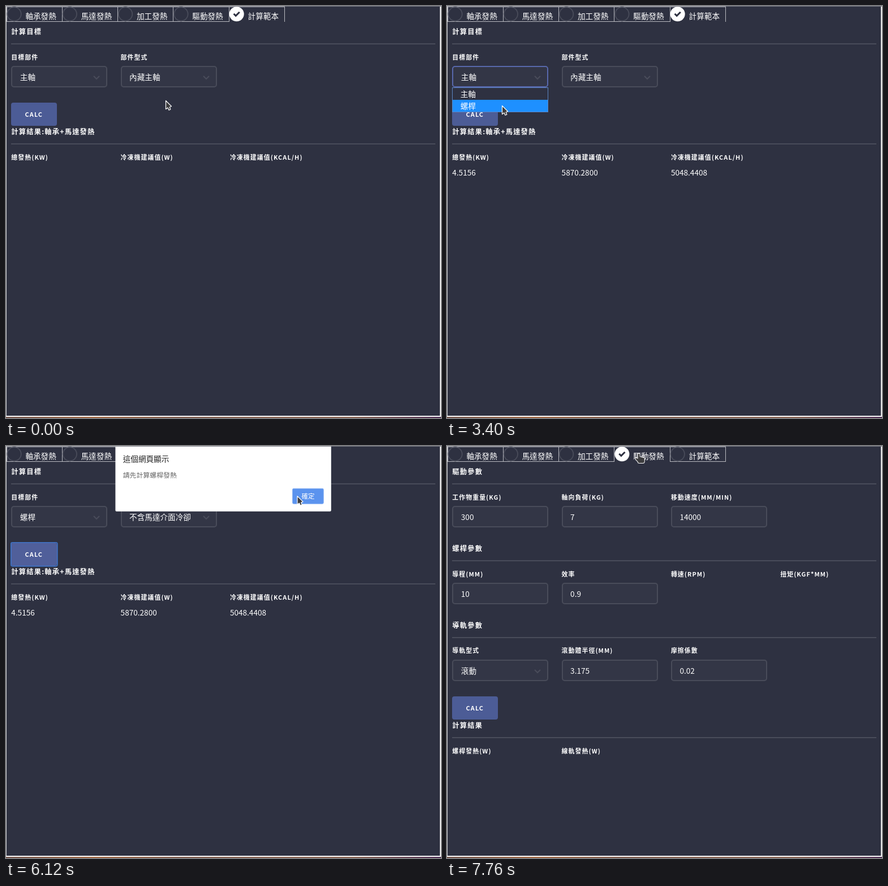
An HTML page with a canvas that plays this animation: 769 px wide and 729 px high, repeating every 8000 ms.

```html
<!DOCTYPE html>
<html lang="zh-Hant">
<head>
<meta charset="utf-8">
<title>發熱計算</title>
<style>
html, body { margin: 0; width: 100%; height: 100%; overflow: hidden; background: #2e3141; }
canvas { display: block; }
</style>
</head>
<body>
<canvas id="stage" width="769" height="729"></canvas>
<script>
const W = 769, H = 729, LOOP = 8000;
const FONT = '"Noto Sans CJK TC", "Noto Sans CJK", sans-serif';
const BG = '#2e3141', DIM = '#494c5a', PRIMARY = '#4c5c96', TAB_LINE = '#b9bac0';
const EM = 13.6, LABEL = 0.8 * EM, HEAD = 0.9 * EM;
const LEFT = 9.3, COLUMN = 193.3, SECTION = 135.8, TAB = 98.3;
const col = i => LEFT + COLUMN * i;

const screen = document.getElementById('stage').getContext('2d');
const layer = document.createElement('canvas');
layer.width = W;
layer.height = 120;
const dialogCtx = layer.getContext('2d');
let g = screen;

// Stops of the pointer; it eases to each one between two times
const stops = [
  { from: 440, to: 520, x: 270, y: 171 },
  { from: 680, to: 1040, x: 99, y: 192 },
  { from: 1440, to: 1520, x: 71, y: 193 },
  { from: 2280, to: 2640, x: 94, y: 129 },
  { from: 3280, to: 3400, x: 97, y: 176 },
  { from: 4360, to: 4480, x: 74, y: 193 },
  { from: 5280, to: 5640, x: 501, y: 94 },
  { from: 5800, to: 6120, x: 517, y: 87 },
  { from: 6640, to: 6920, x: 338, y: 56 },
  { from: 7240, to: 7480, x: 339, y: 13 }
];

const smooth = f => f * f * (3 - 2 * f);

// The pointer is refreshed in ticks, slower once results are shown
function pointerAt(t) {
  const tick = t < 2000 ? 40 : 120;
  let x = 282, y = 167;
  for (const s of stops) {
    if (t < s.from) break;
    const steps = Math.round((s.to - s.from) / tick) + 1;
    const k = smooth(Math.min(1, (Math.floor((t - s.from) / tick) + 1) / steps));
    x += (s.x - x) * k;
    y += (s.y - y) * k;
  }
  return { x, y };
}

function rect(x, y, w, h, color) {
  g.fillStyle = color;
  g.fillRect(x, y, w, h);
}

function round(x, y, w, h, r, fill, stroke, lw = 2) {
  g.beginPath();
  g.roundRect(x, y, w, h, r);
  if (fill) { g.fillStyle = fill; g.fill(); }
  if (stroke) { g.strokeStyle = stroke; g.lineWidth = lw; g.stroke(); }
}

function check(x, y, dx, up, down, color, width) {
  g.beginPath();
  g.moveTo(x - dx, y - up);
  g.lineTo(x, y);
  g.lineTo(x + down, y - down);
  g.strokeStyle = color;
  g.lineWidth = width;
  g.stroke();
}

// cy is the middle of the glyphs
function text(str, x, cy, size = EM, color = '#fff', weight = 400, spacing = 0) {
  g.font = `${weight} ${size}px ${FONT}`;
  g.letterSpacing = spacing + 'px';
  g.fillStyle = color;
  g.fillText(str, x, Math.round(cy + size * 0.38));
}

const strong = (str, x, cy, size) => text(str, x, cy, size, '#fff', 700, size * 0.1);
const labels = (list, cy) => list.forEach((s, i) => strong(s, col(i), cy, LABEL));

function heading(str, cy) {
  strong(str, LEFT, cy, HEAD);
  rect(9, Math.round(cy + 20.5), 750, 2, DIM);
}

function field(i, top, value, select, focus) {
  const x = Math.round(col(i)), y = Math.round(top);
  round(x + 1, y + 1, 168, 36, 4, '#333646', focus ? '#5868ac' : DIM);
  text(value, col(i) + 15.5, top + 20.2);
  if (select) check(x + 151, y + 23, 5, 5, 5, DIM, 2.2);
}

function section(i, title, names, values, selects = 0, focus = false) {
  const y = SECTION * i;
  heading(title, 45.7 + y);
  labels(names, 90.7 + y);
  values.forEach((v, k) => field(k, 106.1 + y, v, k < selects, focus && k === 0));
}

function results(rows, title, names, fill, focus) {
  const y = Math.round(SECTION * rows + 35.4);
  round(9, y, 81, 41, 4, fill);
  if (focus) round(8.8, y - 0.2, 82, 41.8, 2.5, null, '#3f74c8', 1.6);
  strong('CALC', 33.6, y + 20.7, LABEL);
  heading(title, y + 51.8);
  labels(names, y + 96.8);
}

function tabs(active) {
  const names = ['軸承發熱', '馬達發熱', '加工發熱', '驅動發熱', '計算範本'];
  names.forEach((_, i) => {
    const left = Math.floor(1 + TAB * i), right = Math.floor(1 + TAB * (i + 1));
    rect(left, 1, right - left, 1, TAB_LINE);
    for (const x of [left, right]) rect(x, 1, 1, 27, TAB_LINE);
    if (i !== active) rect(left, 27, right - left + 1, 1, TAB_LINE);
  });
  names.forEach((name, i) => {
    const cx = 14.5 + TAB * i, on = i === active;
    g.beginPath();
    g.arc(cx, 14.3, on ? 13 : 12.2, 0, Math.PI * 2);
    if (on) {
      g.fillStyle = '#fff';
      g.fill();
      check(cx - 1.5, 17.3, 3.6, 3.6, 6.6, BG, 3);
    } else {
      g.strokeStyle = DIM;
      g.lineWidth = 1.8;
      g.stroke();
    }
    text(name, 34.4 + TAB * i, 17.8);
  });
}

function frame() {
  rect(0, 0, W, H, BG);
  rect(0, 0, W, 1, '#7d7f88');
  rect(0, 0, 1, 727, '#d4d5d9');
  rect(767, 1, 2, 726, '#e8e8ea');
  rect(0, 725, W, 2, '#fafafa');
  const strip = g.createLinearGradient(0, 0, W, 0);
  ['#6e5048', '#a0643e', '#7a5648', '#86604f', '#86604f', '#4c2a52']
    .forEach((c, i, all) => strip.addColorStop(i / (all.length - 1), c));
  rect(0, 727, W, 2, strip);
}

function dropdown(row) {
  rect(9, 144, 170, 44, '#5c86c4');
  rect(10, 145, 168, 42, BG);
  rect(10, 145 + 21 * row, 168, 21, '#1e90ff');
  ['主軸', '螺桿'].forEach((s, i) => text(s, 23.7, 156.3 + 21 * i));
}

function templatePage(t, p, hover) {
  const screw = t >= 3800;
  const lit = hover || (t >= 4480 && t < 6640);
  const pressed = t >= 4760 && t < 4880;
  section(0, '計算目標', ['目標部件', '部件型式'],
    screw ? ['螺桿', '不含馬達介面冷卻'] : ['主軸', '內藏主軸'], 2, t >= 2880 && t < 4760);
  results(1, `計算結果:軸承+${t >= 6480 ? '螺桿' : '馬達'}發熱`,
    ['總發熱(KW)', '冷凍機建議值(W)', '冷凍機建議值(KCAL/H)'],
    pressed ? '#5667a2' : lit ? '#505f9a' : PRIMARY,
    (t >= 1760 && t < 2880) || t >= 4760);
  if (t >= 1880) {
    const kw = 4.5156, watt = kw * 1300;
    [kw, watt, watt * 0.86].forEach((v, i) => text(v.toFixed(4), col(i), 294.8));
  }
  if (t >= 2880 && !screw) dropdown(p.y > 166 ? 1 : 0);
}

function drivePage() {
  section(0, '驅動參數', ['工作物重量(KG)', '軸向負荷(KG)', '移動速度(MM/MIN)'], ['300', '7', '14000']);
  section(1, '螺桿參數', ['導程(MM)', '效率', '轉速(RPM)', '扭矩(KGF*MM)'], ['10', '0.9']);
  section(2, '導軌參數', ['導軌型式', '滾動體半徑(MM)', '摩擦係數'], ['滾動', '3.175', '0.02'], 1);
  results(3, '計算結果', ['螺桿發熱(W)', '線軌發熱(W)'], PRIMARY, false);
}

function dialog(t) {
  g = dialogCtx;
  g.clearRect(0, 0, W, 120);
  round(193.4, 1, 381.4, 114.8, [0, 0, 2, 2], '#fff');
  text('這個網頁顯示', 206.7, 23, EM, '#222');
  text('請先計算螺桿發熱', 206.7, 51.2, 11.9, '#666');
  const fill = t >= 6320 ? '#4a86e6' : t >= 5800 ? '#5b93ee' : '#649bf1';
  round(506.5, 75.3, 54.8, 27, 2, fill, '#8bb3f4', 1);
  text('確定', 522.4, 89, 11.5, '#fff');
  g = screen;

  const opening = t < 5120, closing = t >= 6480;
  if (!opening && !closing) {
    g.drawImage(layer, 0, 0);
    return;
  }
  // Slightly tilted, translucent sheet gliding in or out
  g.save();
  g.beginPath();
  g.rect(0, 1, W, H);
  g.clip();
  g.globalAlpha = opening ? 0.4 : 0.17;
  const shift = opening ? 11 : -12;
  for (let y = 0; y < 117; y++) {
    const grow = 1 + y / 11600;
    g.drawImage(layer, 0, y, W, 1, 384 * (1 - grow), y + shift, W * grow, 1);
  }
  g.restore();
}

function arrowShape() {
  const path = new Path2D();
  path.moveTo(0.5, 0.5);
  path.lineTo(0.5, 15.5);
  path.lineTo(4, 13);
  path.lineTo(6, 17.3);
  path.lineTo(8.8, 16);
  path.lineTo(7.2, 12);
  path.lineTo(10.5, 10.5);
  path.closePath();
  return path;
}

// Index finger, three knuckles, palm and thumb
function handShape() {
  const path = new Path2D();
  path.roundRect(-1.5, 0.5, 3.2, 13, 1.6);
  for (let i = 0; i < 3; i++) path.roundRect(1 + 2.8 * i, 6 + 0.8 * i, 3.2, 8, 1.6);
  path.roundRect(-1.5, 9, 11.2, 8, 2.5);
  path.ellipse(-2.4, 11.4, 4, 1.7, 0.8, 0, Math.PI * 2);
  return path;
}

const ARROW = arrowShape(), HAND = handShape();

function pointer({ x, y }, hand) {
  const shape = hand ? HAND : ARROW;
  g.save();
  g.translate(x, y);
  g.lineJoin = 'round';
  g.strokeStyle = '#fff';
  g.lineWidth = hand ? 2 : 1.2;
  g.fillStyle = '#3d3d3f';
  if (hand) g.stroke(shape);
  g.fill(shape);
  if (!hand) g.stroke(shape);
  g.restore();
}

function draw(t) {
  const p = pointerAt(t);
  const onButton = p.x < 90 && p.y > 171 && p.y < 212;
  const drive = t >= 7640;
  frame();
  tabs(drive ? 3 : 4);
  if (drive) drivePage();
  else templatePage(t, p, onButton);
  if (t >= 4880 && t < 6640) dialog(t);
  pointer(p, onButton || p.y < 28);
}

const begin = performance.now();
function tick() {
  draw((performance.now() - begin) % LOOP);
  requestAnimationFrame(tick);
}
tick();
</script>
</body>
</html>
```
